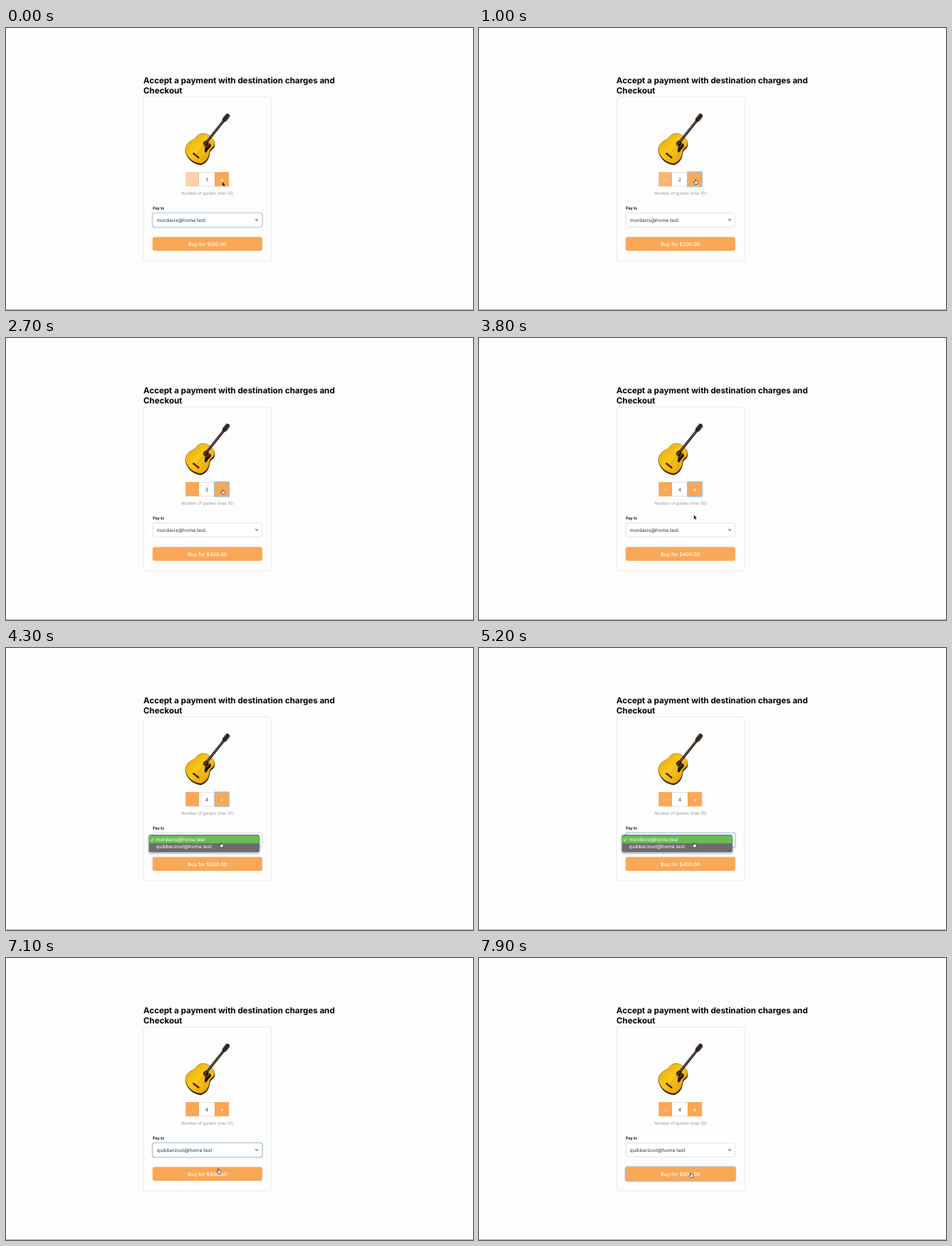
An HTML page that plays this animation: 600 by 362 pixels, repeating every 8 s.

```html
<!DOCTYPE html>
<html lang="en">
<head>
<meta charset="utf-8">
<title>Destination charges checkout</title>
<style>
  html, body { margin: 0; width: 100%; height: 100%; overflow: hidden; background: #fdfdfd; }
  svg { display: block; font-family: Inter, sans-serif; text-rendering: geometricPrecision; }
  .title { font-size: 10.6px; font-weight: 700; }
  .field { font-size: 6.27px; fill: #30364f; }
  .hint { font-size: 5.18px; fill: #939393; }
  .label { font-size: 4.95px; font-weight: 600; }
  .light { font-size: 6.45px; font-weight: 500; fill: #fff; }
  .sign { font-weight: 700; }
  .option { font-size: 6.3px; fill: #fff; }
  .mid { text-anchor: middle; }
  .orange { fill: #faa756; }
  .ring { fill: none; stroke: #9fc5de; stroke-width: 1.5; }
  .box { fill: #fff; stroke: #d9dde2; stroke-width: .8; }
</style>
</head>
<body>
<svg width="600" height="362" viewBox="0 0 600 362">
  <defs>
    <linearGradient id="wood" x1="0" y1="0" x2="1" y2="1">
      <stop offset="0" stop-color="#dd9f0c"/>
      <stop offset=".45" stop-color="#fbc817"/>
      <stop offset="1" stop-color="#dc950b"/>
    </linearGradient>
    <filter id="shadow" x="-10%" y="-30%" width="120%" height="190%">
      <feDropShadow dx="0" dy="1.5" stdDeviation="1.6" flood-opacity=".35"/>
    </filter>
    <path id="body" d="M230.500 158C230 153 232 149 236 146C239 143.500 242 143.500 244.500 140C246.500 137 250 135 255 135.500C259 136 261 138 264 140.500C268 144 269 148 267 151.500C265 154 262 155 261.500 159C261 166 257 172 250 174C242 173 233.500 168 230.500 158Z"/>
  </defs>

  <rect width="600" height="362" fill="#fdfdfd"/>
  <rect y="361" width="600" height="1" fill="#b4b4b4"/>

  <text class="title" x="176.5" y="71.4">Accept a payment with destination charges and</text>
  <text class="title" x="176.5" y="83.9">Checkout</text>
  <rect x="176.8" y="88.5" width="164.2" height="210.5" rx="3" fill="#fdfdfd" stroke="#e9e9e9" stroke-width=".9"/>

  <use href="#body" x=".3" y="2" fill="#371a07"/>
  <use href="#body" fill="url(#wood)" stroke="#7a4c0c" stroke-width=".5"/>
  <g transform="translate(257 148.500) rotate(-51.500)">
    <path d="M3 3C4 7 0 8-3 6.800C-6 6.500-8 8-9.500 6.500C-9 3-6 4-3.500 1Z" fill="#1d130b"/>
    <circle r="3.700" fill="#2a190c" stroke="#b17c1c" stroke-width=".8"/>
    <path d="M-20-5.500V4.500" stroke="#40200d" stroke-width="2.200"/>
    <path d="M2-.6H37" stroke="#2b1f19" stroke-width="3.200"/>
    <path d="M4-.9H37" stroke="#75685e" stroke-width="1.300" stroke-dasharray="2.200 .6"/>
    <path d="M36-2.200L38.500-3.400L47-3.200L48 -.6L46.800 2L38.500 2.200L36 1Z" fill="#33251e"/>
    <path d="M39.500-3.800H46M39.500 2.600H46" stroke="#77706b" stroke-width="1.100" stroke-dasharray="1.300 1.200"/>
    <path d="M-20-.6H2" stroke="#c99a35" stroke-width=".7"/>
  </g>

  <rect class="box" x="247.500" y="185.400" width="21" height="17.600"/>
  <g id="minus">
    <rect class="orange" x="230.800" y="185" width="17.200" height="18.300"/>
    <text class="light sign mid" x="239.400" y="196.800">-</text>
  </g>
  <rect class="orange" x="268" y="185" width="18.500" height="18.300"/>
  <text class="light sign mid" x="277.200" y="196.800">+</text>
  <rect id="plusRing" class="ring" x="267.800" y="184.700" width="19" height="18.900" rx=".8"/>
  <text id="count" class="field mid" x="258" y="196.900"></text>
  <text class="hint mid" x="258.800" y="213.500">Number of guitars (max 10)</text>

  <text class="label" x="188.500" y="233">Pay to</text>
  <rect id="selectRing" class="ring" x="188.200" y="237.200" width="141.300" height="18.600" rx="3"/>
  <rect class="box" x="188.800" y="237.700" width="140.200" height="17.600" rx="2.500"/>
  <text id="payee" class="field" x="193.800" y="248.700"></text>
  <path d="M320.300 245.400L322.100 247.200L323.900 245.400" fill="none" stroke="#30313d" stroke-width="1"/>

  <rect id="buyRing" class="ring" x="188" y="268" width="141.700" height="18.400" rx="3"/>
  <rect class="orange" x="188.300" y="268.200" width="141" height="17.700" rx="2.500"/>
  <text id="price" class="light mid" x="258.800" y="279.500"></text>

  <g id="menu">
    <rect x="183.500" y="239.800" width="142.200" height="22.300" rx="2.200" fill="#6c6c6e" filter="url(#shadow)"/>
    <rect id="highlight" x="183.500" width="142.200" height="9.700" fill="#69bd55"/>
    <path d="M186.300 246.200L187.500 247.700L189.600 243.900" fill="none" stroke="#fff" stroke-width=".8"/>
    <text id="option0" class="option" x="192.800" y="248.200"></text>
    <text id="option1" class="option" x="192.800" y="257.400"></text>
  </g>

  <g id="cursor">
    <path id="arrow" d="M0 0V5.600L1.300 4.400L2.200 6.400L3.100 6L2.300 4.100H4Z" fill="#000" stroke="#fff" stroke-width=".3"/>
    <path id="hand" d="M-.6 .5Q0-.4.500.5V2.300Q1.200 1.800 1.600 2.500Q2.200 2.100 2.500 2.800Q3.200 2.500 3.300 3.300V4.700L2.600 6.500H-.4L-2 4.300Q-2.200 3.200-1.300 3.500L-.6 4.200Z" fill="#fff" stroke="#111" stroke-width=".6"/>
  </g>
</svg>
<script>
const LOOP = 8000;
const PAYEES = ["mordavis@home.test", "quibberzoot@home.test"];
const CLICKS = [870, 1750, 2900];
const PRESS = 800, OPEN = 4250, HOVER_SECOND = 5500, CHOOSE = 6200, BUY = 7350;
// time, x, y of the pointer tip
const POINTER = [
  [0, 278, 197.5], [100, 278, 197.5], [600, 278, 194], [3500, 278, 194],
  [3800, 276, 227], [4150, 276, 249.5], [5300, 276, 249.5], [5600, 276, 254.5],
  [6800, 276, 254.5], [7200, 272, 275.3], [LOOP, 272, 275.3]
];

const el = id => document.getElementById(id);
const show = (id, opacity) => el(id).setAttribute("opacity", opacity);
const write = (id, text) => { if (el(id).textContent !== text) el(id).textContent = text; };
const ramp = (t, start, length = 200) => Math.min(1, Math.max(0, (t - start) / length));
const pulse = (t, on, off) => ramp(t, on) - ramp(t, off);

function pointerAt(t) {
  const i = POINTER.findIndex(key => key[0] > t);
  const [t0, x0, y0] = POINTER[i - 1], [t1, x1, y1] = POINTER[i];
  const k = (t - t0) / (t1 - t0);
  return [x0 + (x1 - x0) * k, y0 + (y1 - y0) * k];
}

function draw(t) {
  const count = 1 + CLICKS.filter(click => t >= click).length;
  write("count", String(count));
  write("price", `Buy for $${count}00.00`);
  write("payee", PAYEES[t >= CHOOSE ? 1 : 0]);

  show("minus", 0.5 + 0.5 * ramp(t, CLICKS[0]));
  show("plusRing", pulse(t, PRESS, OPEN));
  show("selectRing", 0.8 * (1 - ramp(t, PRESS)) + pulse(t, OPEN, BUY));
  show("buyRing", ramp(t, BUY));
  show("menu", t < OPEN ? 0 : 1 - ramp(t, CHOOSE));
  el("highlight").setAttribute("y", t < HOVER_SECOND ? 241 : 250.7);

  const [x, y] = pointerAt(t);
  const overControl = t >= 300 && (y < 204 || (y > 237 && y < 256) || y > 268);
  el("cursor").setAttribute("transform", `translate(${x} ${y})`);
  show("hand", overControl ? 1 : 0);
  show("arrow", overControl ? 0 : 1);
}

PAYEES.forEach((payee, i) => write("option" + i, payee));
const start = performance.now();
function tick() {
  draw((performance.now() - start) % LOOP);
  requestAnimationFrame(tick);
}
tick();
</script>
</body>
</html>
```
